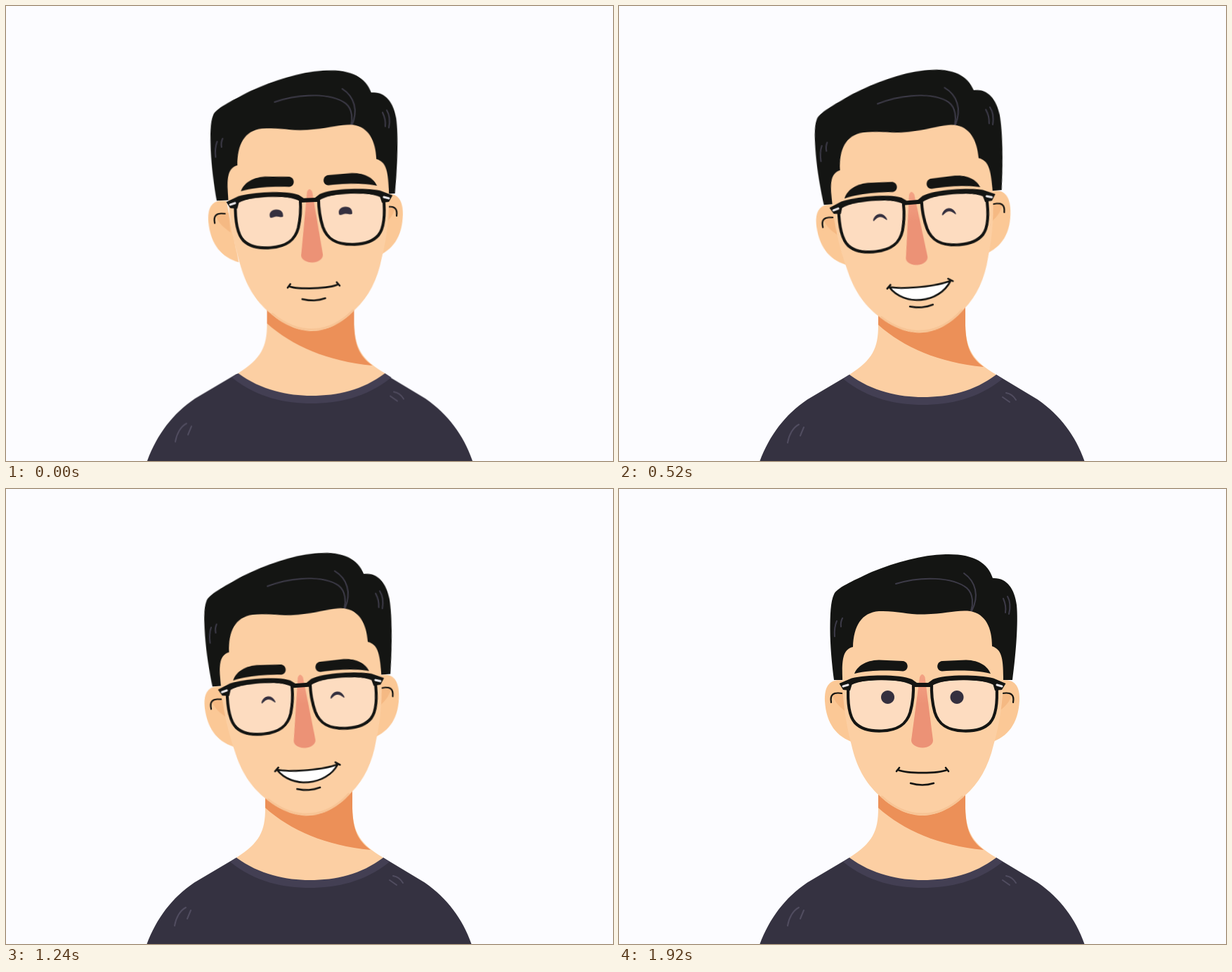
An HTML page without scripts that plays this animation: 864 px wide and 648 px high, repeating every 1960 ms.

```html
<!DOCTYPE html>
<html lang="en">
<head>
<meta charset="utf-8">
<title>Smiling portrait</title>
<style>
html, body { margin: 0; width: 100%; height: 100%; overflow: hidden; background: #fcfcff; }
svg { display: block; width: 100vw; height: 100vh; }
.line { fill: none; stroke-linecap: round; stroke-linejoin: round; }
.ink { stroke: #141513; }
.shine { stroke: #3d3b48; stroke-width: 2; }
.fold { stroke: #514d60; stroke-width: 2; }

.head, .drift, .brows, .eye, .mouth, .lip { animation: 1960ms linear infinite; }
.head { animation-name: tilt; transform-origin: 433px 451px; }
.drift { animation-name: settle; }
.brows { animation-name: lower; }
.eye { animation-name: squint; fill: #35303f; }
.mouth { animation-name: smile; fill: #fff; stroke-width: 2.6; }
.lip { animation-name: drop; stroke-width: 2.4; }

@keyframes tilt {
  0% { transform: rotate(-2.3deg); animation-timing-function: cubic-bezier(.3, .6, .6, 1); }
  26.5% { transform: rotate(-4.75deg); }
  54.3% { transform: rotate(-4.75deg); animation-timing-function: cubic-bezier(.4, 0, .6, 1); }
  87.5%, 100% { transform: rotate(0deg); }
}
/* the face swings back under the hair */
@keyframes settle {
  0% { transform: translate(var(--x), var(--y)); animation-timing-function: cubic-bezier(.33, .67, .67, 1); }
  20%, 100% { transform: translate(0px, 0px); }
}
@keyframes lower {
  0%, 85%, 100% { transform: translate(0px, 0px); }
  8%, 72% { transform: translate(1px, 2.5px); }
}
@keyframes squint {
  0%, 78% { d: path("M-7.5 5C-9.5 -2 -5 -6 1.5 -6C8 -6 12 -2 11 4.5C8 6 5 4 1.5 4C-2 4 -5 6.5 -7.5 5Z"); }
  6%, 72% { d: path("M-8.5 4C-8.5 0 -3.5 -5 1.5 -5C6.5 -5 11 0 11.5 4C10.5 6 7 -.5 1.5 -.5C-4 -.5 -7 6 -8.5 4Z"); }
  85%, 100% { d: path("M-9.5 0C-9.5 -5.2 -5.2 -9.5 0 -9.5C5.2 -9.5 9.5 -5.2 9.5 0C9.5 5.2 5.2 9.5 0 9.5C-5.2 9.5 -9.5 5.2 -9.5 0Z"); }
}
@keyframes smile {
  0% {
    d: path("M397 400C410 405.5 454 405.5 467 400C454 405.5 410 405.5 397 400ZM395 402L399 397M465 397L469 402");
    animation-timing-function: cubic-bezier(.33, .67, .67, 1);
  }
  20% { d: path("M389 396.5C410 401.5 456 401.5 477 394.5C458 426 408 426 389 396.5ZM386 398.5L391 393.5M473.5 391.5L480 395.5"); }
  60.7% {
    d: path("M389 396.5C410 401.5 456 401.5 477 394.5C458 426 408 426 389 396.5ZM386 398.5L391 393.5M473.5 391.5L480 395.5");
    animation-timing-function: cubic-bezier(.45, 0, .55, 1);
  }
  75%, 100% { d: path("M397 400C410 405.5 454 405.5 467 400C454 405.5 410 405.5 397 400ZM395 402L399 397M465 397L469 402"); }
}
@keyframes drop {
  0% { transform: translate(0px, 0px); animation-timing-function: cubic-bezier(.33, .67, .67, 1); }
  20% { transform: translate(1px, 7.5px); }
  60.7% { transform: translate(1px, 7.5px); animation-timing-function: cubic-bezier(.45, 0, .55, 1); }
  75%, 100% { transform: translate(0px, 0px); }
}
</style>
</head>
<body>
<svg viewBox="0 0 864 648">
  <defs>
    <linearGradient id="blush" x1="0" y1="0" x2="0" y2="1">
      <stop offset="0" stop-color="#f3a284"/>
      <stop offset=".4" stop-color="#ec9276"/>
    </linearGradient>
    <g id="ear">
      <path fill="#fbc896" d="M320 273C300 269 292 281 293 302C295 335 310 353 334 361Z"/>
      <path fill="#f5b983" d="M304 292Q310 288 322 290L324 318C316 312 306 304 304 292Z"/>
      <path class="line ink" stroke-width="2.2" d="M302 304C300 293 305 289 317 291"/>
    </g>
    <path id="brow" fill="#141513" d="M335 263C339 253 350 244 370 243.5L404 245C413 246 413 259 404 259.5C385 258.5 360 257 335 263Z"/>
    <g id="lens">
      <path class="ink" fill="#fddcc0" stroke-width="4.2" d="M326.500 279C325 303 327 323 336 333C345 342.500 360 345 374 344.500C396 344 409 336 414.500 318C418 305 419.500 292 419 278C400 267 345 267 326.500 279Z"/>
      <path fill="#141513" d="M313.500 277L331 269.500C355 264 400 264 417 271L424 276H433V282H420L416 277C398 270.500 350 270.500 332 277L329 287L319 286Z"/>
      <path class="line" stroke="#e9e6e8" stroke-width="3" d="M319 281L326 279"/>
    </g>
  </defs>

  <rect width="864" height="648" fill="#fcfcff"/>

  <g class="drift" style="--x:1px;--y:-1.5px">
    <path fill="#353241" d="M199 652L200.500 648C214 612 236 582 268 560.500L328 525H537L596 560.500C628 583 650 612 662.500 648L664 652Z"/>
    <g class="line fold">
      <path d="M240 622C242 610 248 600 256 596M258 612L263 600"/>
      <path d="M546 557L556 564M551 551C558 552 562 556 565 561"/>
    </g>
  </g>

  <g class="drift" style="--x:2.500px;--y:-2px">
    <path fill="#433f53" d="M328 525L319 531C355 560 395 568 432 568C470 568 510 560 546 531L537 525Z"/>
    <path fill="#fccfa3" d="M369 420V455C369 487 361 504 328 525C360 549 400 557 432 557C470 557 505 549 537 525C505 506 494 490 493 455V420Z"/>
    <path fill="#ec9058" d="M369 425V454C405 486 455 508 519 514C500 500 494 485 493 455V425Z"/>
  </g>

  <g class="head">
    <g class="drift" style="--x:1px;--y:0px">
      <use href="#ear"/>
      <use href="#ear" transform="translate(863) scale(-1 1)"/>
      <path fill="#141513" d="M306 272C303 250 300.500 222 300.500 200C300.500 180 301 160 306 150C310 141 330 132 360 118C395 104 430 94 465 93C505 92 525 105 532 127C552 126 563 142 566 165C568.500 190 565 235 560 272Z"/>
      <g class="line shine">
        <path d="M394 135C430 124 475 125 495 141C505 150 504 165 501 174"/>
        <path d="M491 120C508 132 513 152 502 174"/>
        <path d="M553 153C557 160 557 170 555 178M547 156C550 163 551 170 550 176"/>
        <path d="M310 188Q306 197 307 210M318 184Q315 190 316 196"/>
      </g>
    </g>

    <g class="drift" style="--x:5.500px;--y:-2px">
      <path fill="#fccfa3" d="M318 268C317 240 320 228 333 225C334 195 345 176 370 174C395 173 410 179 435 178.500C465 178 480 172 500 174C522 178 531 198 531 224C544 228 547 240 547 268C547 300 542 335 533 365C526 395 512 420 492 437C470 458 449 465 432 465C415 465 393 458 371 437C350 418 338 395 331 365C323 335 318 300 318 268Z"/>
      <path class="line" stroke="#f7c495" stroke-width="3" d="M374 438C395 457 415 463 432 463C449 463 469 457 489 438"/>
    </g>

    <g class="drift" style="--x:8px;--y:-3px">
      <path fill="url(#blush)" d="M428 268Q431.500 260 435.500 268L447 358C447 364 440 368.500 432 368.500C424 368.500 416 364 416 358Z"/>
    </g>

    <g class="drift" style="--x:7px;--y:-3px">
      <g class="brows">
        <use href="#brow"/>
        <use href="#brow" transform="translate(864) scale(-1 1)"/>
      </g>
    </g>

    <g class="drift" style="--x:7px;--y:-2.500px">
      <use href="#lens"/>
      <use href="#lens" transform="translate(864) scale(-1 1)"/>
      <g transform="translate(382.500 296.500)"><path class="eye"/></g>
      <g transform="translate(481 296.500)"><path class="eye"/></g>
    </g>

    <g class="drift" style="--x:8px;--y:-2px">
      <path class="mouth ink" stroke-linecap="round" stroke-linejoin="round"/>
      <path class="lip line ink" d="M415 419Q432 424 448 419"/>
    </g>
  </g>
</svg>
</body>
</html>
```
